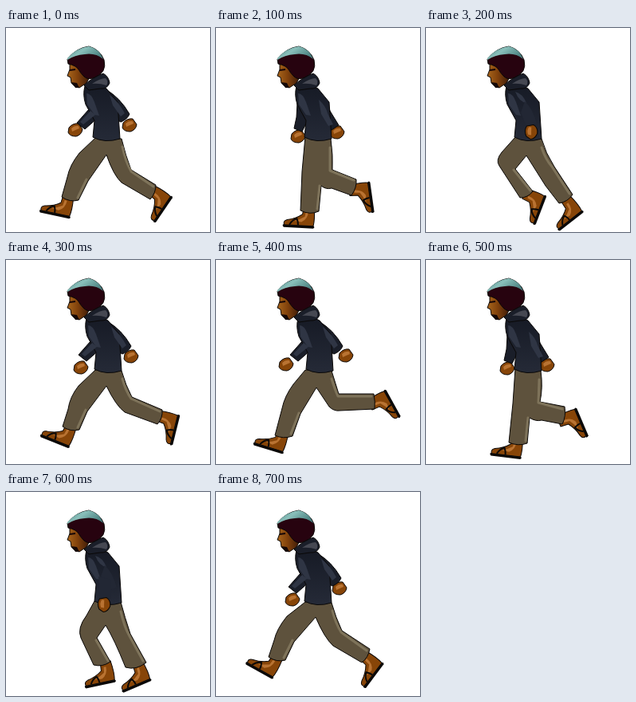
An HTML page without scripts that plays this animation: 256 by 256 pixels, repeating every 800 ms.

```html
<!DOCTYPE html>
<html lang="en">
<head>
<meta charset="utf-8">
<title>Walk cycle</title>
<style>
  html, body { margin: 0; width: 100%; height: 100%; overflow: hidden; background: #fff; }
  svg { display: block; width: 100%; height: 100%; }
  .ink { stroke: #090706; stroke-width: 1; stroke-linejoin: round; }
  .skin { fill: #874508; }
  .glow { fill: #b97332; }
  .coat { fill: #1a1e29; }
  .sheen { fill: #2f3544; }
  .legs { fill: #5e523d; }
  .rim { fill: none; stroke: #7e735a; stroke-width: 3; stroke-linecap: round; stroke-linejoin: round; }
  .pose { visibility: hidden; animation: show .8s step-end infinite; animation-delay: calc((var(--i) - 8) * .1s); }
  @keyframes show {
    0% { visibility: visible; }
    12.5%, 100% { visibility: hidden; }
  }
</style>
</head>
<body>
<svg viewBox="0 0 256 256">
  <defs>
    <linearGradient id="cap" x2="1" y2=".5">
      <stop offset="0" stop-color="#457978"/>
      <stop offset=".45" stop-color="#8ac0bb"/>
      <stop offset="1" stop-color="#4b8180"/>
    </linearGradient>
    <linearGradient id="face">
      <stop offset="0" stop-color="#a8661c"/>
      <stop offset=".4" stop-color="#83430c"/>
      <stop offset="1" stop-color="#2c1108"/>
    </linearGradient>
    <linearGradient id="cloth" x2="0" y2="1">
      <stop offset="0" stop-color="#161a25"/>
      <stop offset="1" stop-color="#252a37"/>
    </linearGradient>

    <!-- ankle at 0,0, toes to the left -->
    <g id="foot">
      <path class="skin ink" d="M-7-4L-8 6Q-16 12-27 14Q-33 16-30 21L6 21Q8 12 6-4Z"/>
      <path class="glow" d="M-4 2L-5 9Q-11 13-18 15L-9 16Q-1 12-1 2Z"/>
      <path d="M-32 20L6 20Q9 22 6 23.500L-31 23.500Q-33 22-32 20Z" fill="#0b0908"/>
      <path d="M-24 20Q-20 13-15 12Q-13 16-13 20" fill="none" stroke="#0b0908" stroke-width="2"/>
    </g>

    <g id="fist">
      <path class="skin ink" d="M-8-3Q-3-9 4-8L9-1Q8 6 1 8Q-7 8-9 3Z"/>
      <path class="glow" d="M-5-2Q-1-6 4-5L5-2Q0 0-4 2Z"/>
    </g>

    <g id="torso">
      <path class="ink" d="M101 73Q98 84 102 96L113 116L111 137Q126 145 145 139L142 93L128 76Q114 68 101 73Z" fill="url(#cloth)"/>
      <path class="sheen" d="M103 82Q109 82 113 93L119 110L113 109L104 96Z"/>
    </g>

    <g id="head">
      <path class="coat ink" d="M98 72Q108 62 122 57Q129 61 130 69Q127 77 118 76L104 78Z"/>
      <path d="M108 70Q118 63 125 63Q129 67 126 72Q117 69 108 70Z" fill="#464852"/>
      <path class="ink" d="M80 40L80 52L77 60L81 62L82 69Q86 75 92 75L101 69L108 56L96 40Z" fill="url(#face)"/>
      <path d="M82 68L89 69L92 75L87 75Z" fill="#160806"/>
      <path d="M80 53L87 52" stroke="#160507" stroke-width="2"/>
      <path class="ink" d="M77 39Q88 25 104 23Q118 27 123 40Q127 56 111 62Q104 66 98 61Q93 56 91 52Q88 47 78 45Z" fill="#27030f"/>
      <path d="M77 38Q88 25 104 23Q117 26 122 39Q112 31 99 33Q86 34 77 40Z" fill="url(#cap)"/>
    </g>

    <g id="wide">
      <path class="coat ink" d="M127 77Q145 87 157 108Q154 115 146 118L132 110Z"/>
      <path class="coat ink" d="M102 86L106 102L91 119L101 127L118 112Z"/>
      <use href="#torso"/>
      <path class="sheen" d="M132 84Q143 92 151 107L146 111L136 97ZM108 104L95 118L99 121L114 109Z"/>
    </g>

    <g id="mid">
      <path class="coat ink" d="M102 94L101 112L98 126L108 130L117 112Z"/>
      <path class="coat ink" d="M128 80Q140 90 143 104L154 122L142 130L127 112Z"/>
      <use href="#torso"/>
      <path class="sheen" d="M129 90Q138 98 140 107L147 121L141 123L132 108Z"/>
    </g>

    <g id="down">
      <use href="#torso"/>
      <path class="sheen" d="M112 80Q121 82 126 94Q117 93 112 80Z"/>
      <path d="M124 92Q134 101 139 120L126 124L119 106Z" fill="#222734"/>
    </g>
  </defs>

  <rect width="256" height="256" fill="#fff"/>

  <g class="pose" style="--i:0">
    <use href="#foot" transform="translate(186 205) rotate(-56)"/>
    <use href="#foot" transform="translate(78 215) rotate(12)"/>
    <path class="legs ink" d="M112 138L92 157Q80 172 77 187L70 212Q80 219 91 216L103 192L126 159Q135 185 145 194L181 215Q188 207 188 197L157 178Q150 160 145 139Z"/>
    <path class="rim" d="M90 213L101 190M146 149Q150 168 157 180L185 199"/>
    <use href="#fist" x="87" y="128"/>
    <use href="#fist" x="155" y="122"/>
    <use href="#wide" transform="translate(-2)"/>
    <use href="#head"/>
  </g>

  <g class="pose" style="--i:1">
    <use href="#foot" transform="translate(171 203) rotate(-98)"/>
    <use href="#foot" transform="translate(117 228) rotate(3)"/>
    <path class="legs ink" d="M112 136L108 180L106 229Q118 235 129 230L132 198Q138 203 145 201L170 210Q177 200 176 190L146 178Q147 160 144 139Z"/>
    <path class="rim" d="M127 227L130 198M143 150L143 179L173 191"/>
    <use href="#fist" x="103" y="136"/>
    <use href="#fist" x="152" y="131"/>
    <use href="#mid"/>
    <use href="#head"/>
  </g>

  <g class="pose" style="--i:2">
    <use href="#foot" transform="translate(178 217) rotate(-38)"/>
    <use href="#foot" transform="translate(127 209) rotate(-69)"/>
    <path class="legs ink" d="M112 137L95 156Q87 166 92 173L118 213Q128 213 134 205L112 177L126 160L150 198L167 220Q178 218 184 209L161 174Q150 157 145 139Z"/>
    <path class="rim" d="M110 178L131 204M145 150Q150 165 158 174L180 208"/>
    <use href="#down"/>
    <use href="#fist" transform="translate(132 130) rotate(-65)"/>
    <use href="#head"/>
  </g>

  <g class="pose" style="--i:3">
    <use href="#foot" transform="translate(194 196) rotate(-76)"/>
    <use href="#foot" transform="translate(81 212) rotate(22)"/>
    <path class="legs ink" d="M112 138L91 158Q80 172 78 187L71 209Q81 216 92 213L102 190L126 158Q138 183 149 191L190 206Q197 198 196 188L158 172Q150 157 145 139Z"/>
    <path class="rim" d="M90 210L100 188M146 149Q150 164 157 174L193 190"/>
    <use href="#fist" x="94" y="135"/>
    <use href="#fist" x="157" y="121"/>
    <use href="#wide"/>
    <use href="#head"/>
  </g>

  <g class="pose" style="--i:4">
    <use href="#foot" transform="translate(196 180) rotate(-119)"/>
    <use href="#foot" transform="translate(84 219) rotate(17)"/>
    <path class="legs ink" d="M112 138L97 156Q86 171 83 186L74 220Q84 225 96 221L106 193L126 160L142 184Q148 190 155 189L199 187Q200 178 198 168L154 168Q150 155 145 139Z"/>
    <path class="rim" d="M94 218L104 192M145 149Q149 162 153 171L195 171"/>
    <use href="#fist" x="88" y="131"/>
    <use href="#fist" x="163" y="120"/>
    <use href="#wide" transform="translate(2)"/>
    <use href="#head"/>
  </g>

  <g class="pose" style="--i:5">
    <use href="#foot" transform="translate(170 201) rotate(-113)"/>
    <use href="#foot" transform="translate(115 226) rotate(7)"/>
    <path class="legs ink" d="M112 136L109 180L104 229Q116 234 127 230L130 198Q138 203 145 201L171 206Q176 196 174 184L143 178Q147 160 144 139Z"/>
    <path class="rim" d="M125 227L128 198M142 150L141 179L171 187"/>
    <use href="#fist" x="102" y="136"/>
    <use href="#fist" x="152" y="132"/>
    <use href="#mid"/>
    <use href="#head"/>
  </g>

  <g class="pose" style="--i:6">
    <use href="#foot" transform="translate(167 218) rotate(-23)"/>
    <use href="#foot" transform="translate(126 217) rotate(-12)"/>
    <path class="legs ink" d="M111 137L101 155Q89 171 94 183L110 217Q121 220 131 213L114 183L125 167Q136 185 150 220Q163 224 176 214L156 178Q149 157 144 138Z"/>
    <path class="rim" d="M113 186L128 212M144 150Q148 168 154 179L172 212"/>
    <use href="#down"/>
    <path d="M116 106L131 110L132 134L118 136Z" fill="#222734"/>
    <use href="#fist" transform="translate(123 141) rotate(-65)"/>
    <use href="#head"/>
  </g>

  <g class="pose" style="--i:7">
    <use href="#foot" transform="translate(188 207) rotate(-53)"/>
    <use href="#foot" transform="translate(76 211) rotate(29)"/>
    <path class="legs ink" d="M112 138L89 156Q76 172 73 186L66 207Q76 214 87 211L98 188L125 157Q136 183 147 193L183 214Q191 208 193 197L158 174Q150 157 145 139Z"/>
    <path class="rim" d="M85 208L96 186M146 149Q150 165 157 176L189 199"/>
    <use href="#fist" x="96" y="135"/>
    <use href="#fist" x="155" y="121"/>
    <use href="#wide"/>
    <use href="#head"/>
  </g>
</svg>
</body>
</html>
```
